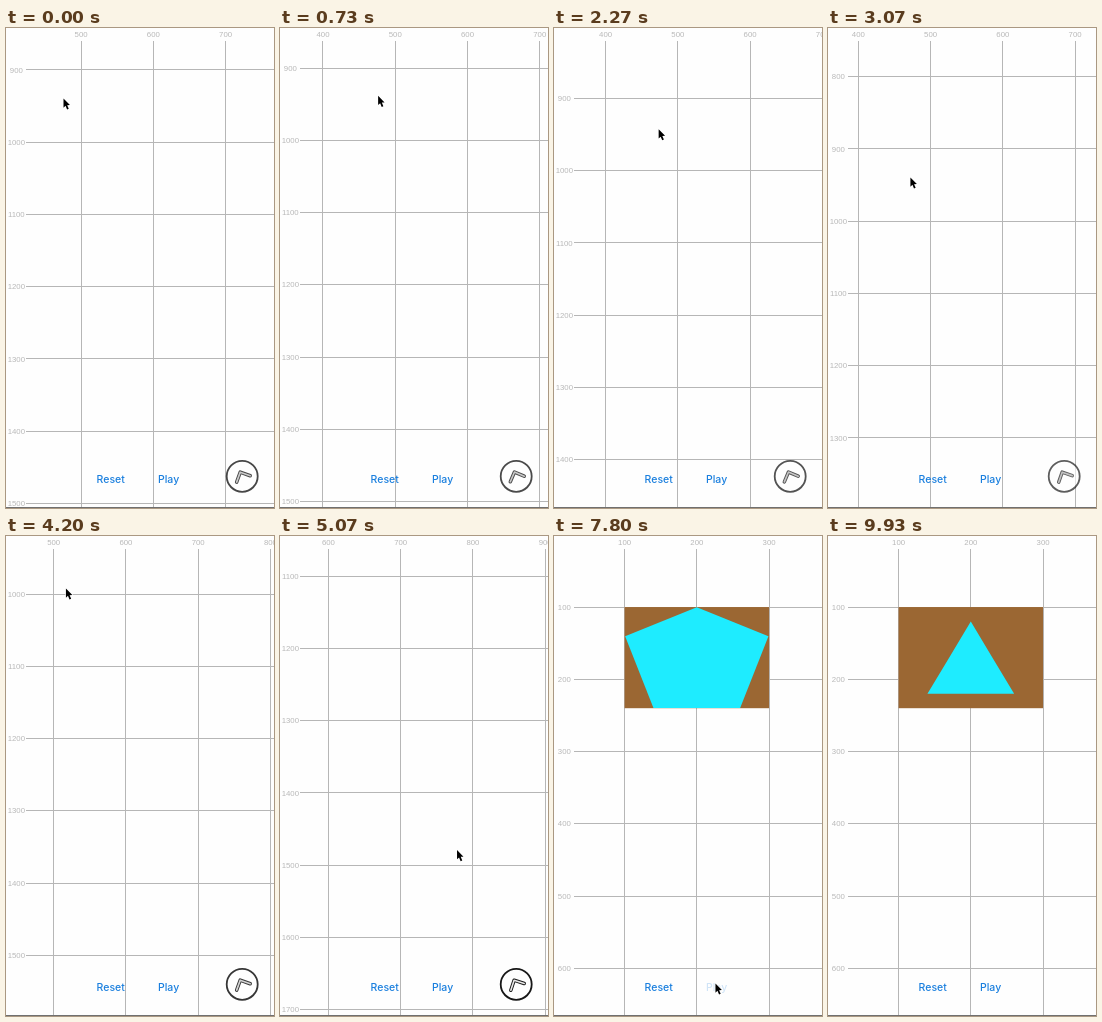
Recreate the animation shown at these times as an HTML page with a canvas. Size 268 by 480 pixels, loop 9990 ms.

```html
<!DOCTYPE html>
<html lang="en">
<head>
<meta charset="utf-8">
<title>Scrolling canvas</title>
<style>
  html, body { margin: 0; width: 100%; height: 100%; overflow: hidden; background: #fefefe; }
  canvas { display: block; width: 268px; height: 480px; }
</style>
</head>
<body>
<canvas id="stage"></canvas>
<script>
const W = 268, H = 480, LOOP = 9.99, SCALE = 0.7225;
const HOME = { x: -1.7, y: -1.2 };
const REST = { x: -400.3, y: -773.7 };
const GRAB = { x: 342, y: 678 };
const RELEASE = 4.02, LAG = 0.03, GLIDE_TAU = 0.5;
const HOME_START = 6.03, HOME_TIME = 0.55;
const MORPH_START = 7.68, MORPH_TIME = 1.9;

// time, x, y, vx, vy
const DRAG = [
  [-0.1, 53, 69, 40, 9],
  [0, 57, 70, 40, 11],
  [1.47, 116, 58, -22, -7],
  [3.07, 82, 149, -48, 7],
  [RELEASE, 59, 52, -227, -286]
];
const POINTER = [
  [RELEASE, 59, 52], [4.4, 60, 52], [5.5, 236, 447], [6.3, 236, 447],
  [7.05, 206, 456], [7.5, 161, 447], [8.1, 161, 447], [8.8, 276, 440]
];
const PENTAGON = [[200, 100], [300, 140], [260, 240], [140, 240], [100, 140]];
const TRIANGLE = [[200, 120], [230, 170], [260, 220], [140, 220], [170, 170]];

const canvas = document.getElementById('stage');
const ctx = canvas.getContext('2d');
const ratio = window.devicePixelRatio || 1;
canvas.width = W * ratio;
canvas.height = H * ratio;

const clamp = v => Math.max(0, Math.min(1, v));
const mix = (a, b, k) => a + (b - a) * k;
const ease = k => { k = clamp(k); return k * k * (3 - 2 * k); };
const snap = v => Math.floor(v) + 0.5;

function along(keys, t) {
  let i = 0;
  while (i < keys.length - 2 && t >= keys[i + 1][0]) i++;
  const [t0, x0, y0, vx0 = 0, vy0 = 0] = keys[i];
  const [t1, x1, y1, vx1 = 0, vy1 = 0] = keys[i + 1];
  const span = t1 - t0, s = clamp((t - t0) / span), e = ease(s);
  const out = s * (1 - s) * (1 - s) * span, into = s * s * (s - 1) * span;
  return {
    x: mix(x0, x1, e) + vx0 * out + vx1 * into,
    y: mix(y0, y1, e) + vy0 * out + vy1 * into
  };
}

// The content trails the hand slightly, then glides on after release.
function offsetAt(t) {
  const dragTime = t - LAG;
  const hand = along(DRAG, dragTime);
  const held = { x: hand.x - GRAB.x, y: hand.y - GRAB.y };
  if (dragTime < RELEASE) return held;
  const glide = 1 - Math.exp((RELEASE - dragTime) / GLIDE_TAU);
  const back = ease((t - HOME_START) / HOME_TIME);
  return {
    x: mix(mix(held.x, REST.x, glide), HOME.x, back),
    y: mix(mix(held.y, REST.y, glide), HOME.y, back)
  };
}

function polygon(points) {
  ctx.beginPath();
  points.forEach(([x, y]) => ctx.lineTo(x, y));
  ctx.closePath();
}

function text(label, x, y, font, color) {
  ctx.font = font;
  ctx.fillStyle = color;
  ctx.textAlign = 'center';
  ctx.textBaseline = 'middle';
  ctx.fillText(label, x, y);
}

function line(x0, y0, x1, y1, color) {
  ctx.strokeStyle = color;
  ctx.lineWidth = 1;
  ctx.beginPath();
  ctx.moveTo(x0, y0);
  ctx.lineTo(x1, y1);
  ctx.stroke();
}

function drawGrid(offset) {
  const font = '7.8px "Liberation Sans", Arial, sans-serif';
  const gray = '#b6b6b6', labelGray = '#b8b8b8';
  for (let n = 0; n <= 2000; n += 100) {
    const x = n * SCALE + offset.x, y = n * SCALE + offset.y;
    if (x >= 20 && x < W + 10) {
      line(snap(x), 13, snap(x), H, gray);
      text(n, x, 6.5, font, labelGray);
    }
    if (y >= 13 && y < H + 5) {
      line(20, snap(y), W, snap(y), gray);
      text(n, 10.3, y + 0.5, font, labelGray);
    }
  }
}

function drawShape(offset, t) {
  const k = ease((t - MORPH_START) / MORPH_TIME);
  ctx.save();
  ctx.translate(offset.x, offset.y);
  ctx.scale(SCALE, SCALE);
  ctx.fillStyle = '#9b6733';
  ctx.fillRect(100, 100, 200, 140);
  polygon(PENTAGON.map(([x, y], i) => [mix(x, TRIANGLE[i][0], k), mix(y, TRIANGLE[i][1], k)]));
  ctx.fillStyle = '#1eecff';
  ctx.fill();
  ctx.restore();
}

function drawCompass(offset) {
  const dx = offset.x - HOME.x, dy = offset.y - HOME.y;
  const alpha = clamp(Math.hypot(dx, dy) / 930);
  if (alpha < 0.002) return;
  ctx.save();
  ctx.globalAlpha = alpha;
  ctx.translate(236.2, 448.3);
  ctx.beginPath();
  ctx.arc(0, 0, 15.5, 0, Math.PI * 2);
  ctx.fillStyle = '#fefefe';
  ctx.fill();
  ctx.strokeStyle = '#000';
  ctx.lineWidth = 1.8;
  ctx.stroke();
  ctx.rotate(Math.atan2(dy, dx));
  ctx.beginPath();
  ctx.moveTo(-2.9, -7.5);
  ctx.lineTo(4.6, 0);
  ctx.lineTo(-2.9, 7.5);
  ctx.lineCap = ctx.lineJoin = 'round';
  for (const [width, color] of [[3.5, '#000'], [1.6, '#fefefe']]) {
    ctx.lineWidth = width;
    ctx.strokeStyle = color;
    ctx.stroke();
  }
  ctx.restore();
}

function drawButtons(t) {
  const font = '500 10.5px Inter, "Open Sans", sans-serif', blue = '#1a7fde';
  text('Reset', 104.7, 452, font, blue);
  const dim = clamp((t - 7.6) / 0.1) * (1 - clamp((t - 9.5) / 0.2));
  ctx.globalAlpha = mix(1, 0.2, dim);
  text('Play', 162.6, 452, font, blue);
  ctx.globalAlpha = 1;
}

function drawCursor(t) {
  const { x, y } = along(t < RELEASE ? DRAG : POINTER, t);
  if (x > W + 4) return;
  ctx.save();
  ctx.translate(x, y + 0.5);
  ctx.scale(0.92, 0.92);
  polygon([[0.5, 0], [0.5, 10], [2.7, 8], [4.4, 12], [6.2, 11.2], [4.5, 7.3], [7.5, 7.1]]);
  ctx.lineJoin = 'round';
  ctx.lineWidth = 1.4;
  ctx.strokeStyle = '#fff';
  ctx.stroke();
  ctx.fillStyle = '#000';
  ctx.fill();
  ctx.restore();
}

function draw() {
  const t = performance.now() / 1000 % LOOP;
  const offset = offsetAt(t);
  ctx.setTransform(ratio, 0, 0, ratio, 0, 0);
  ctx.fillStyle = '#fefefe';
  ctx.fillRect(0, 0, W, H);
  drawGrid(offset);
  drawShape(offset, t);
  line(0, 479.5, W, 479.5, '#707070');
  drawButtons(t);
  drawCompass(offset);
  drawCursor(t);
  requestAnimationFrame(draw);
}
draw();
</script>
</body>
</html>
```
